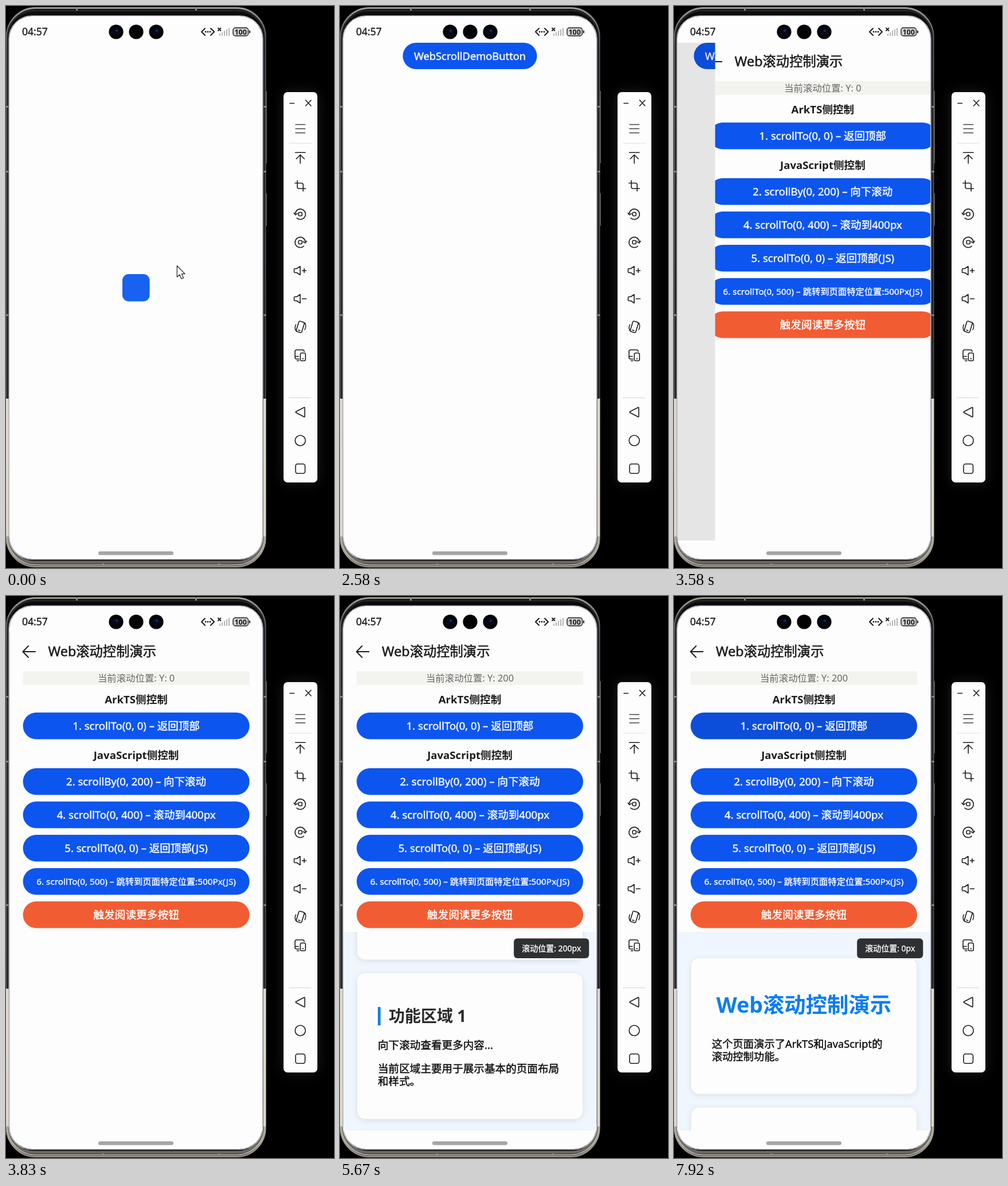
An HTML page with a canvas that plays this animation: 572x979 px, repeating every 8000 ms.

```html
<!DOCTYPE html>
<html lang="zh-CN">
<head>
<meta charset="utf-8">
<title>Web滚动控制演示</title>
<style>
html, body { margin: 0; width: 100%; height: 100%; overflow: hidden; background: #000; }
canvas { display: block; width: 572px; height: 979px; }
</style>
</head>
<body>
<canvas id="stage"></canvas>
<script>
const W = 572, H = 979, LOOP = 8000;
const FONT = '"Noto Sans", "Noto Sans CJK SC", "Noto Sans CJK", sans-serif';
const WHITE = '#fdfdfd', BLUE = '#0d55ef', ORANGE = '#f25c32', INK = '#1c1c1e';
const SCREEN = { x: 6, y: 18, w: 441, h: 945, r: 39 };
const PAGE_TOP = 64, PAGE_BOTTOM = 931, WEB_TOP = 585;
const WEB_SCALE = 1.17;

// Timeline in ms
const SPLASH_END = 750, PUSH = 3404, WEB_READY = 3950;
const SCROLL_DOWN = 5450, SCROLL_UP = 7870, HEADER_LAG = 150;

const canvas = document.getElementById('stage');
const dpr = window.devicePixelRatio || 1;
canvas.width = W * dpr;
canvas.height = H * dpr;
const c = canvas.getContext('2d');

const clamp = v => Math.min(1, Math.max(0, v));
const ease = v => v * v * (3 - 2 * v);
const span = (t, from, length) => clamp((t - from) / length);

// Critically damped spring used by the page push
function spring(ms) {
  const a = 19.1 * Math.max(0, ms) / 1000;
  return 1 - (1 + a) * Math.exp(-a);
}

// How far a button is held down around its release time
const pressed = (t, release) => span(t, release - 150, 60) * (1 - span(t, release + 20, 200));

function box(x, y, w, h, r, fill) {
  c.beginPath();
  c.roundRect(x, y, w, h, r);
  if (fill) { c.fillStyle = fill; c.fill(); }
}

function ring(x, y, w, h, r, color, width) {
  box(x, y, w, h, r);
  c.strokeStyle = color;
  c.lineWidth = width;
  c.stroke();
}

function disc(x, y, r, fill) {
  c.beginPath();
  c.arc(x, y, r, 0, 7);
  c.fillStyle = fill;
  c.fill();
}

function path(d, color = INK, width = 1.6) {
  c.strokeStyle = color;
  c.lineWidth = width;
  c.stroke(new Path2D(d));
}

// Medium weight is a regular face with a hairline outline
function text(str, x, y, size, color, align = 'left', weight = 400) {
  const medium = weight === 500;
  c.font = `${medium ? 400 : weight} ${size}px ${FONT}`;
  c.textAlign = align;
  c.fillStyle = c.strokeStyle = color;
  const base = y + size * 0.365;
  c.fillText(str, x, base);
  if (!medium) return;
  c.lineWidth = size * 0.024;
  c.strokeText(str, x, base);
}

function within(x, y, w, h, draw) {
  c.save();
  c.beginPath();
  c.rect(x, y, w, h);
  c.clip();
  draw();
  c.restore();
}

function drawPhone() {
  box(453, 148, 2, 126, 1, '#66645f');
  box(453, 326, 2, 57, 1, '#66645f');
  box(0, 1, 453.5, 977, 52, '#0c0c0d');

  const rim = c.createLinearGradient(0, 0, 0, H);
  rim.addColorStop(0, '#a09d97');
  rim.addColorStop(0.07, '#5f5d59');
  rim.addColorStop(0.698, '#4a4947');
  rim.addColorStop(0.699, '#e4dfd3');
  rim.addColorStop(0.93, '#d2cdc0');
  rim.addColorStop(1, '#8a867e');
  ring(1.5, 3.5, 450.5, 973, 50, rim, 3);
  ring(3, 8, 447.5, 963, 46, '#252527', 3);

  within(0, 684, 455, 240, () => ring(2.8, 8, 448, 963, 46, '#dcd7ca', 4));
  within(0, 924, 455, 55, () => {
    ring(3.5, 8, 446.5, 961, 46, '#6b6863', 5);
    ring(2.5, 5, 448.5, 968.5, 49, '#bcb7ab', 2);
  });
  ring(5.2, 17.2, 442.6, 946.6, 40, '#c8c8d6', 1.4);
  c.fillStyle = '#8a8883';
  for (const y of [174, 287, 537]) {
    c.fillRect(0, y, 4, 3);
    c.fillRect(449.5, y, 4, 3);
  }
  for (const x of [122, 330]) c.fillRect(x, 2, 3, 6);
  for (const x of [168, 370]) c.fillRect(x, 971, 3, 6);
  box(SCREEN.x, SCREEN.y, SCREEN.w, SCREEN.h, SCREEN.r, WHITE);
}

function drawStatus() {
  text('04:57', 28, 45, 17.5, INK, 'left', 500);
  for (const x of [192, 227, 262]) disc(x, 45, 12.6, '#030305');
  for (const x of [192, 262]) {
    disc(x, 45, 7, '#06091c');
    disc(x + 1, 43, 2.2, '#14285a');
  }
  path('M347 39 341 45 347 51 M357 39 363 45 357 51', INK, 2);
  for (const x of [348, 352, 356]) disc(x, 45, 1.4, INK);
  path('M370 38.5 374.5 43 M374.5 38.5 370 43', INK, 1.8);
  c.fillStyle = '#b4b4b4';
  for (let i = 0; i < 5; i++) {
    const h = 4 + i * 2.4;
    c.fillRect(372 + i * 4, 52 - h, 2, h);
  }
  box(395.5, 37.5, 27.5, 15, 4.5, '#d2d2d2');
  ring(396, 38, 26.5, 14, 4, INK, 1.4);
  box(424, 42.5, 2, 5, 1, INK);
  text('100', 409.2, 45, 12.6, INK, 'center', 700);
}

function drawToolbar() {
  c.save();
  c.shadowColor = 'rgba(120,120,120,.25)';
  c.shadowBlur = 24 * dpr;
  box(484, 150, 59, 680, 7, WHITE);
  c.restore();
  c.lineCap = c.lineJoin = 'round';
  path('M495 169.5H502.5 M522.5 164 532 174 M532 164 522.5 174');
  path('M505 206.5H521.5 M505 213.8H521.5 M505 221H521.5', '#44444a');
  path('M494 239H533', '#dedede', 1);
  c.setLineDash([1, 2]);
  path('M494 682.5H533', '#b8b8b8', 1);
  c.setLineDash([]);

  path('M504.5 255.3H522 M513.2 274V259.5 M506.3 266.3 513.2 259.3 520.2 266.3');
  path('M508 304V315Q508 318 511 318H522.5 M504 308.5H515Q518.2 308.5 518.2 311.5V322.5');

  // Rotate left, and its mirror image
  for (const [y, side] of [[362.5, 1], [411.5, -1]]) {
    c.save();
    c.translate(513.2, y);
    c.scale(side, 1);
    path('M-6 6.8A9 9 0 1 0 -8.8 -1 M-11 -2 -8.6 1.4 -5 -1');
    ring(-3, -3, 6, 6, 1.5, INK, 1.6);
    c.restore();
  }

  for (const y of [461, 510]) {
    path(`M503.5 ${y - 3.5}H507L513 ${y - 7.5}V${y + 7.5}L507 ${y + 3.5}H503.5Q502.5 ${y + 3.5} 502.5 ${y + 2}V${y - 2}Q502.5 ${y - 3.5} 503.5 ${y - 3.5}Z M516.5 ${y}H523.5`);
  }
  path('M520 457.5V464.5');

  c.save();
  c.translate(513.2, 559);
  c.rotate(0.3);
  ring(-5, -9.5, 10, 19, 2.5, INK, 1.6);
  path('M-1.5 6.3H1.5');
  c.restore();
  path('M505.5 555Q502.5 561 506 566 M521 552Q524.5 557 521 564', INK, 1.5);

  path('M511 615H507Q504 615 504 612V602Q504 599 507 599H517Q520 599 520 602 M504 610.5H510 M507.5 618H511');
  ring(513.3, 604.5, 9, 13.5, 2.2, INK, 1.6);
  path('M516.8 614.5H518.8', INK, 1.3);

  path('M519.5 699.5Q521 698.5 521 700.5V714.5Q521 716.5 519.5 715.5L506 708.5Q504.5 707.5 506 706.5Z');
  c.beginPath();
  c.arc(513.2, 757, 9, 0, 7);
  c.stroke();
  ring(505, 797.7, 16.5, 16.5, 3.5, INK, 1.6);
}

function drawHome() {
  box(109.5, 64, 234, 46, 23, BLUE);
  text('WebScrollDemoButton', 226.5, 87, 18.3, '#fff', 'center', 500);
}

const BUTTONS = [
  { y: 203, label: '1. scrollTo(0, 0) – 返回顶部', release: SCROLL_UP },
  { y: 300, label: '2. scrollBy(0, 200) – 向下滚动', release: SCROLL_DOWN },
  { y: 358, label: '4. scrollTo(0, 400) – 滚动到400px' },
  { y: 416, label: '5. scrollTo(0, 0) – 返回顶部(JS)' },
  { y: 474, label: '6. scrollTo(0, 500) – 跳转到页面特定位置:500Px(JS)', size: 15.3 },
  { y: 532, label: '触发阅读更多按钮', size: 18.7, fill: ORANGE },
];

function drawControls(t) {
  const shown = t < SCROLL_DOWN + HEADER_LAG ? 0 : 200;
  path('M29 97H50.5 M38.5 87 28.8 97 38.5 107', INK, 1.9);
  text('Web滚动控制演示', 73, 96, 23.3, INK, 'left', 500);
  c.fillStyle = '#f3f3ef';
  c.fillRect(29, 131, 395, 24);
  text('当前滚动位置: Y: ' + shown, 226.5, 143, 16.4, '#666', 'center');
  text('ArkTS侧控制', 226.5, 180, 18.6, INK, 'center', 700);
  text('JavaScript侧控制', 226.5, 277, 18.6, INK, 'center', 700);
  for (const { y, label, size = 18.55, fill = BLUE, release } of BUTTONS) {
    box(29, y, 395, 46.5, 23.2, fill);
    if (release) box(29, y, 395, 46.5, 23.2, `rgba(0,0,0,${0.1 * pressed(t, release)})`);
    text(label, 226.5, y + 23.2, size, '#fff', 'center', 500);
  }
}

function drawCard(y, h) {
  c.save();
  c.shadowColor = 'rgba(0,0,0,.1)';
  c.shadowBlur = 11 * dpr;
  c.shadowOffsetY = 2 * dpr;
  box(30, y, 393, h, 14, WHITE);
  c.restore();
}

function drawWeb(scroll) {
  c.fillStyle = '#eff6fd';
  c.fillRect(SCREEN.x, WEB_TOP, SCREEN.w, PAGE_BOTTOM - WEB_TOP);
  c.save();
  c.translate(0, -scroll * WEB_SCALE);
  drawCard(631, 236.5);
  text('Web滚动控制演示', 226.5, 712, 37.4, '#0a7df5', 'center', 700);
  text('这个页面演示了ArkTS和JavaScript的', 66, 780, 18.3, '#111', 'left', 500);
  text('滚动控制功能。', 66, 802.5, 18.3, '#111', 'left', 500);

  drawCard(891, 254);
  c.fillStyle = '#0a7df5';
  c.fillRect(66, 950, 4.7, 32);
  text('功能区域 1', 85, 966, 28, '#2b2b2b', 'left', 700);
  text('向下滚动查看更多内容...', 66, 1016, 18.6, '#111', 'left', 500);
  text('当前区域主要用于展示基本的页面布局', 66, 1057, 18.6, '#111', 'left', 500);
  text('和样式。', 66, 1079.5, 18.6, '#111', 'left', 500);
  drawCard(1169, 254);
  c.restore();

  const label = `滚动位置: ${scroll}px`;
  c.font = `400 14px ${FONT}`;
  const w = c.measureText(label).width + 28;
  box(434.3 - w, 596.5, w, 34.5, 6, '#2e3032');
  text(label, 420.3, 613.7, 14, '#fff', 'right', 500);
}

function drawCursor(t) {
  if (t > 2450) return;
  const nudge = ease(span(t, 300, 900));
  const move = ease(span(t, 1700, 650));
  c.save();
  c.translate(298 + nudge - 60 * move, 452 - 1.5 * nudge - 362 * move);
  const arrow = new Path2D('M0.3 0.5V20L4.8 16 8 23.3 11.5 21.8 8.4 14.6H14Z');
  c.fillStyle = '#fff';
  c.fill(arrow);
  c.strokeStyle = '#222';
  c.lineWidth = 1.2;
  c.stroke(arrow);
  c.restore();
}

function drawPages(t) {
  const p = spring(t - PUSH);
  const reveal = SCREEN.w * (1 - p);
  const pageH = PAGE_BOTTOM - PAGE_TOP;

  if (t < SPLASH_END) {
    box(203, 467, 47.5, 47.5, 11, '#1762f0');
    return;
  }
  within(SCREEN.x, PAGE_TOP, SCREEN.w, pageH, () => {
    if (p < 0.999) {
      c.save();
      c.translate(-88 * p, 0);
      drawHome();
      c.restore();
      c.fillStyle = `rgba(0,0,0,${0.11 * p})`;
      c.fillRect(SCREEN.x, PAGE_TOP, SCREEN.w, pageH);
    }
    if (p <= 0) return;
    within(SCREEN.x + reveal, PAGE_TOP, SCREEN.w, pageH, () => {
      c.fillStyle = WHITE;
      c.fillRect(SCREEN.x, PAGE_TOP, SCREEN.w, pageH);
      c.translate(reveal / 2, 0);
      drawControls(t);
    });
    if (t < WEB_READY) return;
    const scroll = t >= SCROLL_DOWN && t < SCROLL_UP ? 200 : 0;
    within(SCREEN.x, WEB_TOP, SCREEN.w, PAGE_BOTTOM - WEB_TOP, () => drawWeb(scroll));
  });
}

function render(t) {
  c.setTransform(dpr, 0, 0, dpr, 0, 0);
  c.fillStyle = '#000';
  c.fillRect(0, 0, W, H);
  c.lineCap = c.lineJoin = 'round';
  drawPhone();
  drawPages(t);
  drawStatus();
  box(161, 950, 131, 6.5, 3.2, '#a6a6a8');
  drawToolbar();
  drawCursor(t);
}

const start = performance.now();
function tick() {
  render((performance.now() - start) % LOOP);
  requestAnimationFrame(tick);
}
tick();
</script>
</body>
</html>
```
